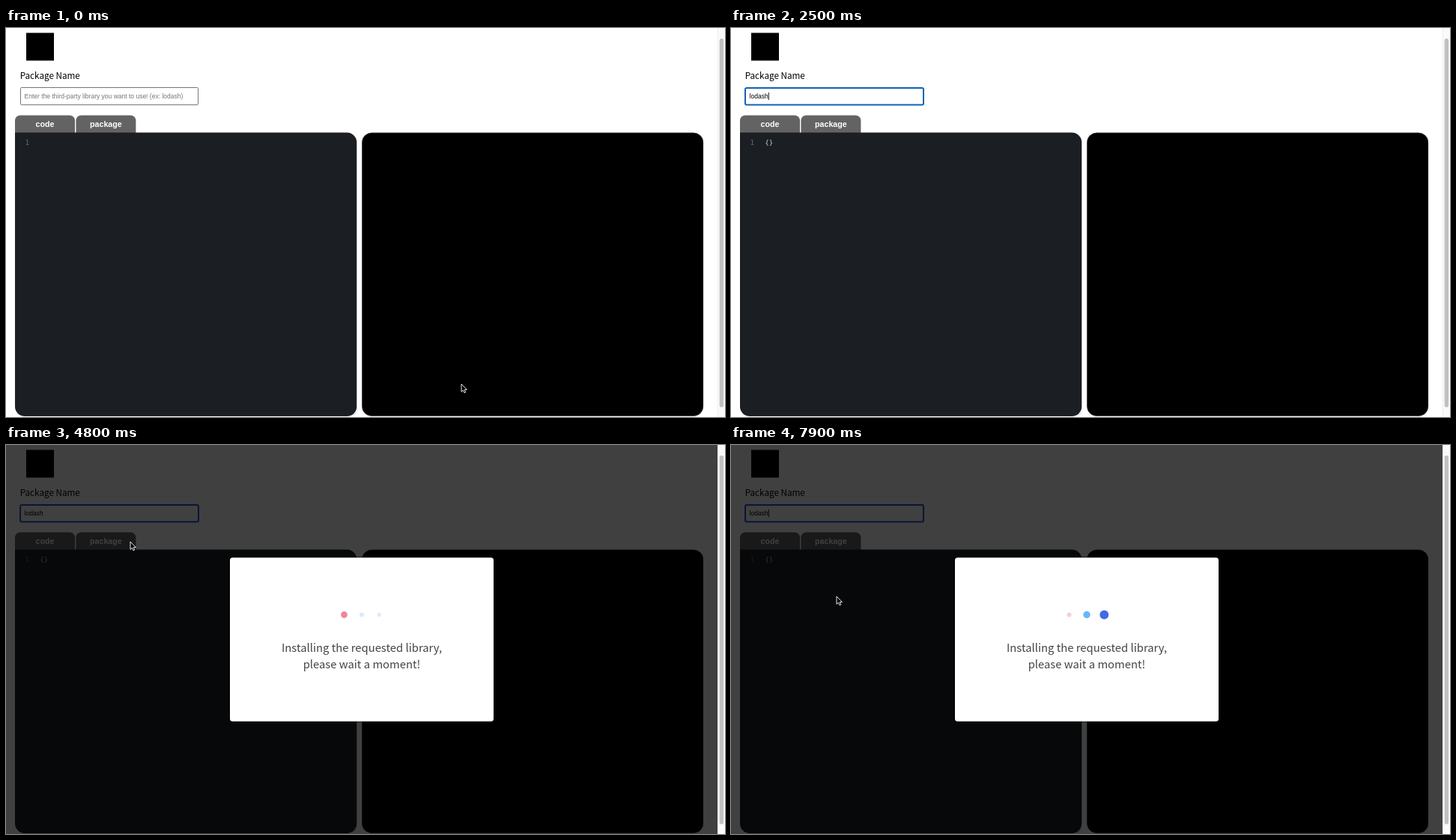
Animation of 960x519 px, one loop 8000 ms. Source, as an HTML page with a canvas:

```html
<!DOCTYPE html>
<html lang="en">
<head>
<meta charset="utf-8">
<title>Package playground</title>
<style>
  html, body { margin: 0; width: 100%; height: 100%; overflow: hidden; background: #fff; }
  canvas { display: block; }
</style>
</head>
<body>
<canvas id="stage" width="960" height="519"></canvas>
<script>
const ctx = document.getElementById('stage').getContext('2d');
const LOOP = 8000, STEP = 100;
const ARIAL = '"Liberation Sans", Arial, sans-serif';
const MONO = '"DejaVu Sans Mono", Menlo, monospace';
const TITLE = '"Noto Sans CJK KR", "Noto Sans CJK JP", "Noto Sans CJK SC", "Noto Sans", sans-serif';
const DARK = '#1b1f23';

const OPEN_JSON = 1000, HOVER = 1200, FOCUS = 1500, CARET_OFF = 1800, TYPING = 2000, MODAL = 2700;
const HALF = 336.5, PULSE_START = 2602, PULSE_DELAY = 113;

// Pointer paths: [time, x, y]; the pointer is hidden between paths.
const paths = [
  [[0, 608, 475], [500, 38, 22], [600, 38, 22], [800, 136, 134], [1000, 139, 135],
   [1200, 60, 87], [1400, 60, 87], [1500, 180, 212], [1999, 180, 212]],
  [[2200, 181, 128], [2399, 181, 128]],
  [[4500, 150, 106], [4800, 166, 129], [5300, 380, 259], [5800, 430, 266],
   [6200, 445, 246], [6600, 445, 246], [7100, 200, 215], [7500, 141, 202], [8000, 141, 202]]
];
const strokes = [[2000, 2], [2100, 3], [2200, 4], [2400, 5], [2500, 6]];
const dots = [[451.5, '#e8334f'], [475, '#1e90ff'], [498.3, '#4169e1']];

const smooth = u => u * u * (3 - 2 * u);
const mix = (a, b, u) => a + (b - a) * u;

function pointerAt(t) {
  const path = paths.find(p => t >= p[0][0] && t <= p[p.length - 1][0]);
  if (!path) return null;
  const i = Math.max(1, path.findIndex(k => k[0] >= t));
  const [a, b] = [path[i - 1], path[i]];
  const u = smooth((t - a[0]) / (b[0] - a[0]));
  return { x: mix(a[1], b[1], u), y: mix(a[2], b[2], u) };
}

const inside = (p, x, y, w, h) => p && p.x >= x && p.x < x + w && p.y >= y && p.y < y + h;

function box(x, y, w, h, r, fill) {
  ctx.beginPath();
  ctx.roundRect(x, y, w, h, r);
  ctx.fillStyle = fill;
  ctx.fill();
}

function frame(x, y, w, h, r, width, color) {
  ctx.beginPath();
  ctx.roundRect(x, y, w, h, r);
  ctx.lineWidth = width;
  ctx.strokeStyle = color;
  ctx.stroke();
}

function label(str, x, y, font, color, align = 'left') {
  ctx.font = font;
  ctx.textAlign = align;
  ctx.fillStyle = color;
  ctx.fillText(str, x, y);
}

function tab(str, x, hot) {
  box(x, 116.5, 80, 23.5, [7, 7, 0, 0], hot ? DARK : '#636363');
  label(str, x + 40, 131.5, 'bold 10.67px ' + ARIAL, '#fff', 'center');
}

function caretOn(t) {
  if (t < FOCUS) return false;
  if (t < TYPING) return t < CARET_OFF;
  return t < MODAL || t % (2 * HALF) >= HALF;
}

function input(t) {
  box(19, 79, 238, 24, 1, '#fff');
  if (t >= FOCUS) frame(19, 80, 238, 22.5, 2, 2, t >= MODAL ? '#2058d8' : '#1062b8');
  else frame(19.5, 79.5, 237, 23, 1, 1, t >= HOVER ? '#505050' : '#767676');

  const typed = strokes.filter(s => t >= s[0]).pop();
  const text = typed ? 'lodash'.slice(0, typed[1]) : '';
  if (text) label(text, 24.6, 93.8, '8.5px ' + ARIAL, '#000');
  else label('Enter the third-party library you want to use! (ex: lodash)', 24.6, 93.8, '8.5px ' + ARIAL, '#757575');
  if (caretOn(t)) {
    ctx.font = '8.5px ' + ARIAL;
    ctx.fillStyle = '#000';
    ctx.fillRect(24.8 + ctx.measureText(text).width, 86, 0.9, 10);
  }
}

function page(t, p) {
  ctx.fillStyle = '#fff';
  ctx.fillRect(0, 0, 960, 519);
  box(27, 6.5, 37, 37, 0, '#000');
  label('Package Name', 18.7, 67.6, '500 11.7px ' + TITLE, '#000');
  input(t);

  tab('code', 12, inside(p, 12, 116, 80, 24));
  tab('package', 93.4, inside(p, 93, 116, 80, 24));
  box(12, 139.6, 456.3, 378.4, [0, 13, 13, 13], DARK);
  label('1', 25.6, 156, '9.33px ' + MONO, '#5d6d7e');
  if (t >= OPEN_JSON) label('{}', 45.2, 156, '9.33px ' + MONO, '#a5cdee');
  ctx.beginPath();
  ctx.moveTo(463, 517.5);
  ctx.lineTo(467.5, 513);
  ctx.lineWidth = 0.6;
  ctx.strokeStyle = '#999';
  ctx.stroke();
  box(475.3, 139.8, 455.7, 377.9, 13, '#000');
  frame(475.6, 140.1, 455.1, 377.3, 13, 0.6, '#3a3a3a');
}

function scrollbar() {
  ctx.fillStyle = '#fafafa';
  ctx.fillRect(950, 0, 10, 519);
  ctx.fillStyle = '#e8e8e8';
  ctx.fillRect(950, 0, 0.7, 519);
  box(952.7, 14, 5.4, 492, 2.7, '#c1c1c1');
}

function modal(t) {
  ctx.fillStyle = 'rgba(0,0,0,.75)';
  ctx.fillRect(0, 0, 950, 519);
  box(298, 149, 354, 221, 4, 'rgba(0,0,0,.5)');
  box(299, 150.3, 352, 218.4, 3.5, '#fff');

  dots.forEach(([x, color], i) => {
    const phase = (t - PULSE_START - i * PULSE_DELAY) / HALF;
    let scale = 1, alpha = 1;
    if (phase >= 0) {
      const u = smooth(1 - Math.abs(phase % 2 - 1));
      scale = mix(0.5, 1.2, u);
      alpha = mix(0.1, 1, u);
    }
    ctx.globalAlpha = alpha;
    ctx.fillStyle = color;
    ctx.beginPath();
    ctx.arc(x, 226.5, 5 * scale, 0, Math.PI * 2);
    ctx.fill();
  });
  ctx.globalAlpha = 1;

  const font = '500 14.8px ' + TITLE;
  label('Installing the requested library,', 475, 276.4, font, '#434448', 'center');
  label('please wait a moment!', 475, 297.6, font, '#434448', 'center');
}

const ARROW = new Path2D('M0 0V10.4L2.4 8.2L4 11.8L5.7 11L4.2 7.6H7.4Z');
const HAND = new Path2D('M1.6 1Q2.6 0 3.4 1V4.4Q4.4 3.8 5 4.7Q6 4.2 6.5 5.2Q7.7 5 7.8 6.2V8.6L6.8 11.5H2.6L0 7.4Q0 6 1.6 7Z');
const BEAM = new Path2D('M-2 -5Q0 -5 0 -4Q0 -5 2 -5M0 -4V5M-2 6Q0 6 0 5Q0 6 2 6');

function pointer(p, t) {
  const live = t < MODAL;
  const overTab = live && inside(p, 12, 116, 161, 24);
  const overInput = live && inside(p, 19, 79, 238, 24);
  ctx.save();
  ctx.translate(p.x, p.y);
  ctx.lineJoin = 'round';
  if (overInput) {
    ctx.lineWidth = 0.8;
    ctx.strokeStyle = '#000';
    ctx.stroke(BEAM);
  } else {
    const shape = overTab ? HAND : ARROW;
    ctx.fillStyle = overTab ? '#fff' : '#000';
    ctx.strokeStyle = overTab ? '#000' : '#fff';
    ctx.lineWidth = overTab ? 0.7 : 0.9;
    ctx.fill(shape);
    ctx.stroke(shape);
  }
  ctx.restore();
}

function draw(ms) {
  const t = Math.floor(ms % LOOP / STEP) * STEP;
  const p = pointerAt(t);
  page(t, t < MODAL ? p : null);
  if (t >= MODAL) modal(t);
  scrollbar();
  if (p) pointer(p, t);
}

const start = performance.now();
function tick() {
  draw(performance.now() - start);
  requestAnimationFrame(tick);
}
tick();
</script>
</body>
</html>
```
